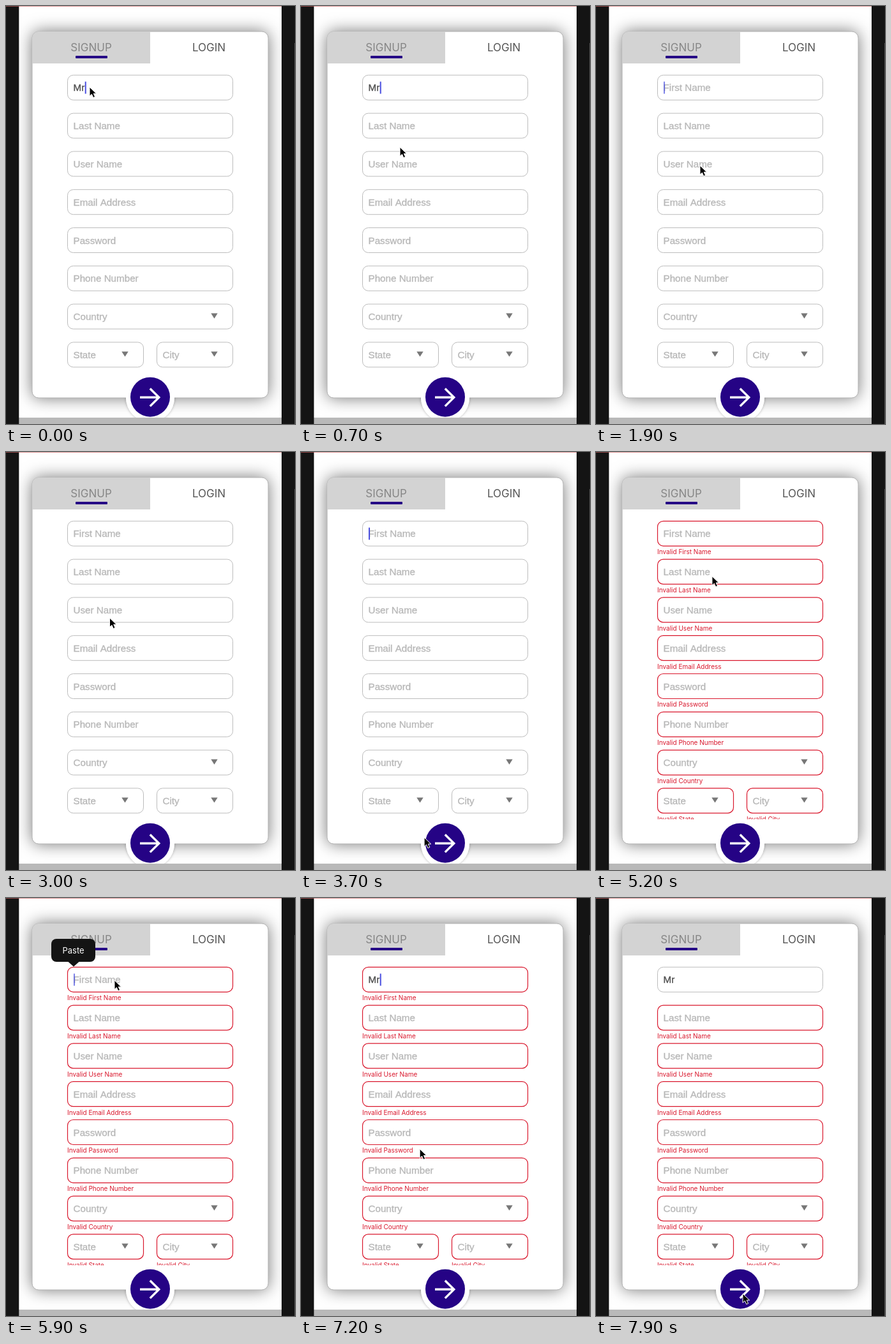
Animation, 453 px wide and 655 px high, one loop 8000 ms. Source, as an HTML page with a canvas:

```html
<!DOCTYPE html>
<html lang="en">
<head>
<meta charset="utf-8">
<title>Signup form</title>
<style>
  html, body { margin: 0; width: 100%; height: 100%; overflow: hidden; background: #fff; }
  canvas { display: block; width: 453px; height: 655px; }
</style>
</head>
<body>
<canvas id="stage"></canvas>
<script>
const W = 453, H = 655, LOOP = 8000;
const canvas = document.getElementById('stage');
const ctx = canvas.getContext('2d');
const dpr = window.devicePixelRatio || 1;
canvas.width = W * dpr;
canvas.height = H * dpr;

const SANS = '"Liberation Sans", Arial, sans-serif';
const UI = 'Inter, Roboto, sans-serif';
const INDIGO = '#250385', RED = '#d9172c', GREY = '#bcbcbc';
const ROW = 59.8, TOP = 108, FIELD_H = 39;

const labels = ['First Name', 'Last Name', 'User Name', 'Email Address',
  'Password', 'Phone Number', 'Country'];
const fields = labels.map((label, i) =>
  ({ label, x: 96, y: TOP + i * ROW, w: 260, menu: label === 'Country' }));
fields.push({ label: 'State', x: 96, y: TOP + 7 * ROW, w: 120, menu: true });
fields.push({ label: 'City', x: 236, y: TOP + 7 * ROW, w: 120, menu: true });

// Pointer tip: time, x, y
const pointerPath = [
  [0, 131, 127], [100, 131, 127], [500, 147, 192], [900, 163, 250],
  [2900, 163, 250], [3100, 162, 270], [3200, 163, 298], [3500, 180, 510],
  [3700, 193, 604], [4000, 229, 615], [4600, 229, 615], [4850, 218, 510],
  [5200, 182, 195], [5450, 170, 129], [6650, 170, 129], [6900, 173, 190],
  [7200, 186, 392], [7300, 200, 516], [7500, 230, 620], [8000, 230, 620]
];

const clamp = v => Math.max(0, Math.min(1, v));
const ramp = (t, a, b) => clamp((t - a) / (b - a));

function pointerAt(t) {
  const i = Math.max(1, pointerPath.findIndex(p => p[0] > t));
  const [t0, x0, y0] = pointerPath[i - 1], [t1, x1, y1] = pointerPath[i];
  const k = ramp(t, t0, t1);
  return [x0 + (x1 - x0) * k, y0 + (y1 - y0) * k];
}

function typedAt(t) {
  if (t < 1100) return 'Mr';
  if (t < 1200) return 'M';
  if (t < 6200) return '';
  return t < 6500 ? 'M' : 'Mr';
}

// Solid after an edit, otherwise a soft one-second blink
function caretAt(t) {
  if (t < 1850) return 1;
  if (t >= 6000) return 1 - ramp(t, 7220, 7400);
  const p = (t % 1000) / 1000;
  return p < 0.5 ? ramp(p, 0.35, 0.46) : 1 - ramp(p, 0.86, 0.98) * 0.85;
}

function box(x, y, w, h, r) {
  ctx.beginPath();
  ctx.roundRect(x, y, w, h, r);
}

function poly(points, color) {
  ctx.beginPath();
  points.forEach(([x, y]) => ctx.lineTo(x, y));
  ctx.closePath();
  ctx.fillStyle = color;
  ctx.fill();
}

function disc(x, y, r, color) {
  ctx.beginPath();
  ctx.arc(x, y, r, 0, 2 * Math.PI);
  ctx.fillStyle = color;
  ctx.fill();
}

function text(str, x, y, font, color, align = 'left') {
  ctx.font = font;
  ctx.fillStyle = color;
  ctx.textAlign = align;
  ctx.fillText(str, x, y);
}

// Slightly thickened to give a medium weight
function mediumText(str, x, y, color) {
  text(str, x, y, '15.2px ' + SANS, color);
  ctx.strokeStyle = color;
  ctx.lineWidth = 0.35;
  ctx.strokeText(str, x, y);
}

function shadowed(blur, color, draw) {
  ctx.save();
  ctx.shadowBlur = blur * dpr;
  ctx.shadowColor = color;
  draw();
  ctx.restore();
}

function drawCard() {
  ctx.fillStyle = '#fff';
  ctx.fillRect(0, 0, W, H);
  shadowed(26, 'rgba(0,0,0,0.55)', () => {
    box(41, 40, 370, 574, 10);
    ctx.fillStyle = '#fff';
    ctx.fill();
  });
  ctx.strokeStyle = '#b4b4b4';
  ctx.lineWidth = 1;
  ctx.stroke();

  ctx.save();
  box(41, 40, 370, 574, 10);
  ctx.clip();
  ctx.fillStyle = '#d3d3d3';
  ctx.fillRect(41, 40, 185, 50);
  ctx.restore();

  text('SIGNUP', 133.5, 71, '17px ' + UI, '#868686', 'center');
  text('LOGIN', 318, 71, '17px ' + UI, '#555', 'center');
  box(109, 78, 50, 4, 1);
  ctx.fillStyle = INDIGO;
  ctx.fill();
}

function drawField(f, value, invalid) {
  box(f.x + 0.5, f.y + 0.3, f.w - 1, FIELD_H, 9);
  ctx.fillStyle = '#fff';
  ctx.fill();
  ctx.strokeStyle = invalid ? RED : GREY;
  ctx.lineWidth = invalid ? 1.2 : 1;
  ctx.stroke();
  mediumText(value || f.label, f.x + 9.5, f.y + 25.3, value ? '#505050' : '#b8b8b8');
  if (f.menu) {
    const x = f.x + f.w - 29.5, y = f.y + 14.8;
    poly([[x - 5.2, y], [x + 5.2, y], [x, y + 8.2]], '#777');
  }
  if (invalid) text('Invalid ' + f.label, f.x, f.y + 52.2, '10px ' + UI, RED);
}

function drawForm(t) {
  const typed = typedAt(t);
  ctx.save();
  ctx.beginPath();
  ctx.rect(42, 91, 368, 484.5);
  ctx.clip();
  fields.forEach((f, i) => {
    const invalid = t >= 4250 && (i > 0 || t < 7700);
    drawField(f, i === 0 ? typed : '', invalid);
  });
  ctx.font = '15.2px ' + SANS;
  const x = 106 + ctx.measureText(typed).width;
  ctx.globalAlpha = caretAt(t);
  ctx.fillStyle = '#4a4fe0';
  ctx.fillRect(x, 118.5, 2, 19);
  ctx.restore();
}

function drawButton() {
  shadowed(4, 'rgba(0,0,0,0.28)', () => {
    ctx.beginPath();
    ctx.rect(180, 614, 92, 41);
    ctx.clip();
    disc(226, 614, 38, '#fff');
  });
  disc(226, 614, 38, '#fff');
  disc(226, 612.7, 31, INDIGO);
  ctx.strokeStyle = '#fff';
  ctx.lineWidth = 3.4;
  ctx.lineJoin = 'miter';
  ctx.beginPath();
  ctx.moveTo(210, 613.3);
  ctx.lineTo(240, 613.3);
  ctx.moveTo(225.8, 599.5);
  ctx.lineTo(239.8, 613.3);
  ctx.lineTo(225.8, 627.1);
  ctx.stroke();
}

function drawBezel() {
  ctx.fillStyle = '#b9b9b9';
  ctx.fillRect(20, 645, 412, 10);
  ctx.fillStyle = '#141414';
  ctx.fillRect(0, 0, 20.3, H);
  ctx.fillRect(432, 0, 21, H);
  ctx.fillStyle = '#4a4a4a';
  ctx.fillRect(452, 58, 1, H);
  ctx.fillStyle = 'rgba(205,95,95,0.65)';
  ctx.fillRect(0, 0, 432, 1);
}

function drawPaste(t) {
  const alpha = Math.min(ramp(t, 5600, 5800), 1 - ramp(t, 5950, 6180));
  if (!alpha) return;
  ctx.save();
  ctx.globalAlpha = alpha;
  box(71, 64, 69, 36, 8);
  ctx.fillStyle = '#141414';
  ctx.fill();
  poly([[97, 99.5], [115, 99.5], [106, 107.5]], '#141414');
  text('Paste', 105.5, 87, '13px ' + UI, '#fff', 'center');
  ctx.restore();
}

function drawPointer(t) {
  const [x, y] = pointerAt(t);
  ctx.save();
  ctx.translate(x, y);
  poly([[0, 0], [0, 14.2], [3.4, 11.2], [5.8, 16.6], [8.6, 15.3], [6.2, 10.2], [10.6, 10.2]], '#000');
  ctx.strokeStyle = '#fff';
  ctx.lineWidth = 1;
  ctx.stroke();
  ctx.restore();
}

function draw(t) {
  ctx.setTransform(dpr, 0, 0, dpr, 0, 0);
  drawCard();
  drawForm(t);
  drawButton();
  drawBezel();
  drawPaste(t);
  drawPointer(t);
}

const start = performance.now();
function tick() {
  draw((performance.now() - start) % LOOP);
  requestAnimationFrame(tick);
}
tick();
</script>
</body>
</html>
```
